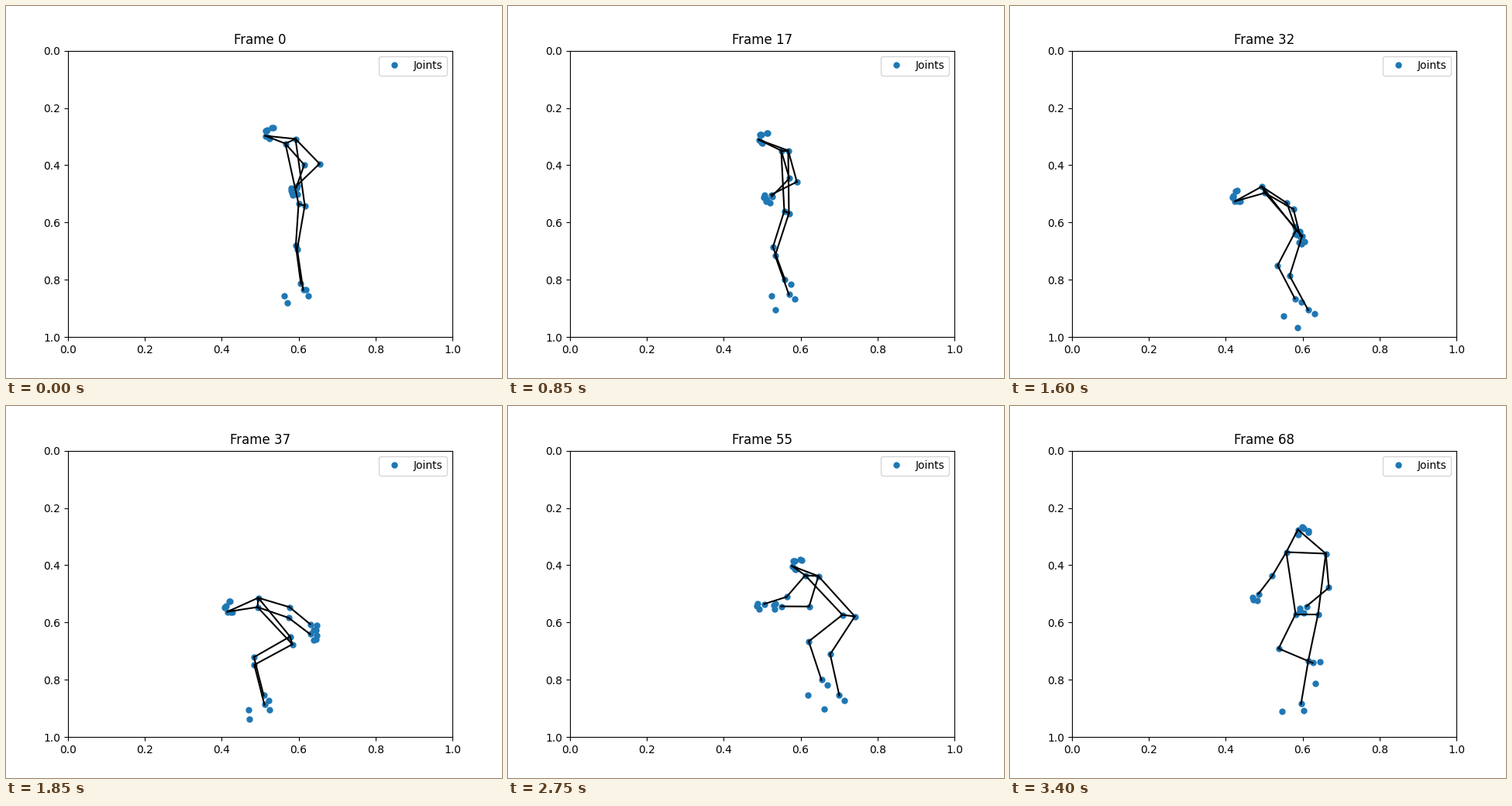
A matplotlib script for the animation above (3.45 s loop, 640 by 480 pixels).

```python
from itertools import pairwise

import numpy as np
import matplotlib.pyplot as plt
from matplotlib.animation import FuncAnimation

FRAMES, STEP = 69, 50
LOST = 44  # tracking fails here and every joint falls on the origin

# Small parts as x + yj: x along the neck, forearm or shin, y across it.
FACE = [1.2 + 6.4j, 0.2 + 6.7j, -0.6 + 7.4j, -6 + 12j, -7.7 + 12j, -4.6 - 2j, -6.2 - 2j]
FINGERS = [10 + 1j, 8 + 3j, 8 - 4j]
FOOT = [8 - 5j, 13 + 23j]

# Share of a limb's reach at which its middle joint sits.
ELBOW, KNEE = 0.55, 0.52

# Key poses in stage pixels: nose, then for the far and the near side
# (shoulder, wrist, hip, ankle, elbow bend, knee bend).
POSES = {
    0: (334 + 167j,
        (360 + 177j, 374 + 234j, 377 + 255j, 380 + 358j, 0.29, 0.05),
        (373 + 171j, 375 + 231j, 385 + 257j, 383 + 366j, 0.50, 0.08)),
    17: (323 + 172j,
         (352 + 186j, 340 + 245j, 356 + 264j, 357 + 353j, 0.29, 0.17),
         (361 + 186j, 339 + 243j, 362 + 267j, 362 + 372j, 0.41, 0.17)),
    26: (336 + 161j,
         (361 + 180j, 324 + 228j, 361 + 262j, 340 + 362j, 0.25, 0.12),
         (373 + 182j, 331 + 235j, 375 + 265j, 377 + 377j, 0.38, 0.04)),
    37: (285 + 265j,
         (325 + 247j, 392 + 281j, 366 + 297j, 332 + 373j, 0.10, 0.38),
         (324 + 259j, 392 + 294j, 369 + 307j, 333 + 385j, 0.08, 0.39)),
    45: (415 + 298j,
         (392 + 258j, 343 + 185j, 324 + 230j, 360 + 113j, 0.03, 0.39),
         (400 + 266j, 348 + 196j, 333 + 234j, 355 + 131j, 0.06, 0.53)),
    55: (366 + 206j,
         (383 + 218j, 330 + 255j, 431 + 269j, 404 + 353j, 0.14, 0.35),
         (400 + 219j, 352 + 258j, 447 + 271j, 427 + 373j, 0.37, 0.21)),
    68: (371 + 159j,
         (356 + 188j, 320 + 242j, 368 + 268j, 390 + 331j, 0.03, 0.53),
         (407 + 190j, 382 + 258j, 397 + 268j, 375 + 384j, 0.26, 0.01)),
}
KEYS = np.array(list(POSES))


def curve(vals):
    """Cubic Hermite curve through the key values, sampled at every frame."""
    t = np.arange(FRAMES)
    slope = np.gradient(vals, KEYS)
    i = np.clip(np.searchsorted(KEYS, t, side="right") - 1, 0, len(KEYS) - 2)
    h = KEYS[i + 1] - KEYS[i]
    u = (t - KEYS[i]) / h
    return ((1 + 2 * u) * (1 - u) ** 2 * vals[i] + u * (1 - u) ** 2 * h * slope[i]
            + u * u * (3 - 2 * u) * vals[i + 1] + u * u * (u - 1) * h * slope[i + 1])


def swing(vec, angle):
    """Let a bone turn and stretch between its key states."""
    return curve(np.abs(vec)) * np.exp(1j * curve(angle))


def attach(joint, bone, parts):
    """Small parts that turn with the bone ending at the joint."""
    along = bone / np.maximum(np.abs(bone), 1)
    return [joint + along * part for part in parts]


def build():
    """Return all joints and the linked pairs, each as a path over the loop."""
    nose = np.array([p[0] for p in POSES.values()])
    sides = [np.array([p[s] for p in POSES.values()]).T for s in (1, 2)]
    far, near = sides

    # The flip is one whole clockwise turn of the torso per loop.
    torso = far[0] - far[2]
    drift = 2 * np.pi * KEYS / FRAMES
    lean = np.unwrap(np.angle(torso) - drift) + drift

    def with_torso(vec):
        return swing(vec, lean + np.unwrap(np.angle(vec / torso)))

    hip = curve(far[2])
    shoulder = hip + swing(torso, lean)
    hips = [hip, hip + curve(near[2] - far[2])]
    shoulders = [shoulder, shoulder + curve(near[0] - far[0])]
    middle = sum(shoulders) / 2
    head = middle + with_torso(nose - (far[0] + near[0]) / 2)

    joints = [head, *attach(head, head - middle, FACE)]
    links = [(shoulders[0], shoulders[1]), (hips[0], hips[1])]
    for side, top, base in zip(sides, shoulders, hips):
        arm = with_torso(side[1] - side[0])
        leg = with_torso(side[3] - side[2])
        elbow = top + arm * (ELBOW - 1j * curve(side[4].real))
        knee = base + leg * (KNEE + 1j * curve(side[5].real))
        wrist, ankle = top + arm, base + leg
        joints += [top, elbow, wrist, base, knee, ankle,
                   *attach(wrist, wrist - elbow, FINGERS),
                   *attach(ankle, ankle - knee, FOOT)]
        links += pairwise([head, top, elbow, wrist])
        links += pairwise([top, base, knee, ankle])
    return np.array(joints), np.array(links)


def to_axes(path):
    """Pixel centres to data coordinates."""
    x = (path.real + 0.5 - 80) / 496
    y = (path.imag + 0.5 - 57.6) / 369.6
    x[..., LOST] = y[..., LOST] = 0
    return x, y


joints, links = build()
joint_x, joint_y = to_axes(joints)
link_x, link_y = to_axes(links)

fig, ax = plt.subplots(figsize=(6.4, 4.8), dpi=100)
ax.set_xlim(0, 1)
ax.set_ylim(1, 0)
dots, = ax.plot([], [], "o", color="tab:blue", markersize=5, label="Joints")
bones = [ax.plot([], [], color="black", lw=1.5)[0] for _ in links]
ax.legend(loc="upper right")
title = ax.set_title("Frame 0")


def update(n):
    title.set_text(f"Frame {n}")
    dots.set_data(joint_x[:, n], joint_y[:, n])
    for bone, x, y in zip(bones, link_x, link_y):
        bone.set_data(x[:, n], y[:, n])
    return [title, dots, *bones]


anim = FuncAnimation(fig, update, frames=FRAMES, interval=STEP,
                     init_func=lambda: update(0), repeat=True)
plt.show()
```
